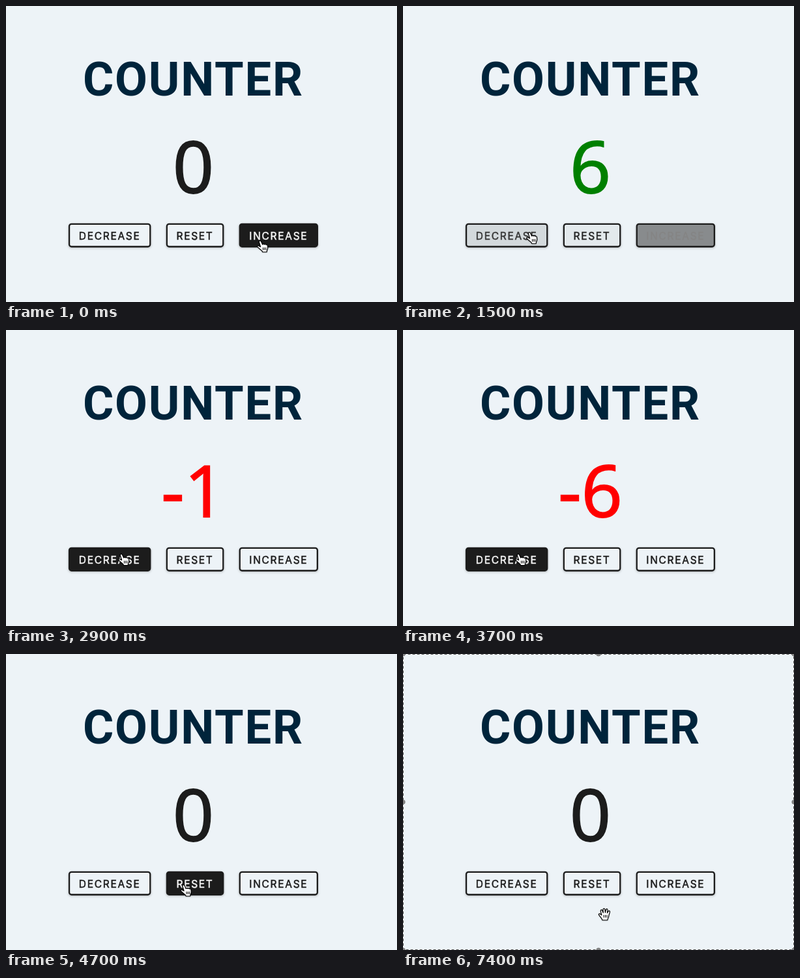
Animation, 600 px wide and 456 px high, one loop 7500 ms. Source, as an HTML page with a canvas:

```html
<!DOCTYPE html>
<html lang="en">
<head>
<meta charset="utf-8">
<title>Counter</title>
<style>
  html, body { margin: 0; width: 100%; height: 100%; overflow: hidden; background: #edf3f7; }
  canvas { display: block; }
</style>
</head>
<body>
<canvas id="stage" width="600" height="456"></canvas>
<script>
const ctx = document.getElementById('stage').getContext('2d');
const W = 600, H = 456, LOOP = 7500, STEP = 100, FADE = 300, CLICK = 167;
const BG = '#edf3f7', INK = 28, LIGHT = 246;
const DARK = `rgb(${INK},${INK},${INK})`;
const CX = 287.5;

// hover: [enter, leave] times in ms
const buttons = [
  { label: 'DECREASE', x: 95.9, w: 126.5, hover: [[1464, 3830]] },
  { label: 'RESET', x: 245.7, w: 88.7, hover: [[1390, 1452], [3880, 4850]] },
  { label: 'INCREASE', x: 357.6, w: 121.4, hover: [[-FADE, 1345]] }
];

// pointer path: time, x, y
const path = [
  [0, 390, 362], [1300, 390, 362], [1345, 358, 360], [1390, 335, 358],
  [1460, 232, 351], [1500, 194, 349], [1700, 177, 345.5], [3750, 177, 345.5],
  [3900, 258, 352], [4000, 272.5, 356], [4750, 272.5, 356], [4850, 285, 373],
  [5000, 308, 398], [5850, 308, 398], [6100, 308.5, 399], [LOOP, 308.5, 399]
];

const clamp = (v, lo, hi) => Math.min(hi, Math.max(lo, v));
const clicks = (t, start, max) => clamp(Math.floor((t - start) / CLICK) + 1, 0, max);

function pointerAt(t) {
  const i = path.findIndex(p => p[0] > t);
  const a = path[i - 1], b = path[i];
  const k = (t - a[0]) / (b[0] - a[0]);
  return [a[1] + (b[1] - a[1]) * k, a[2] + (b[2] - a[2]) * k];
}

function hoverLevel(spans, t) {
  let level = 0;
  for (const [enter, leave] of spans) {
    if (t < enter) continue;
    const peak = clamp((Math.min(t, leave) - enter) / FADE, 0, 1);
    level = Math.max(level, peak - Math.max(0, t - leave) / FADE);
  }
  return level;
}

function valueAt(t) {
  return t >= 4100 ? 0 : clicks(t, 300, 6) - clicks(t, 1830, 12);
}

// grow thickens the strokes, like the smoothing of a desktop browser
function text(str, x, y, font, color, spacing, grow) {
  ctx.font = font;
  ctx.fillStyle = ctx.strokeStyle = color;
  ctx.letterSpacing = spacing + 'px';
  ctx.textAlign = 'left';
  const left = x - ctx.measureText(str).width / 2;
  ctx.fillText(str, left, y);
  if (!grow) return;
  ctx.lineWidth = grow;
  ctx.lineJoin = 'miter';
  ctx.strokeText(str, left, y);
}

function box(x, y, w, h, r) {
  ctx.beginPath();
  ctx.roundRect(x, y, w, h, r);
}

function shadow(color, blur, dy) {
  ctx.shadowColor = color;
  ctx.shadowBlur = blur;
  ctx.shadowOffsetY = dy;
}

function drawButton({ label, x, w, hover }, t) {
  const y = 334.7, h = 37.2, line = 2.3;
  const level = hoverLevel(hover, t);
  ctx.save();
  shadow('rgba(0,0,0,.25)', 3.5, 1.2);
  ctx.fillStyle = BG;
  box(x, y, w, h, 4.6);
  ctx.fill();
  ctx.restore();
  box(x + line / 2, y + line / 2, w - line, h - line, 3.5);
  ctx.fillStyle = `rgba(${INK},${INK},${INK},${level})`;
  ctx.fill();
  ctx.strokeStyle = DARK;
  ctx.lineWidth = line;
  ctx.stroke();
  const c = Math.round(INK + (LIGHT - INK) * level);
  text(label, x + w / 2, 359.7, '400 15.5px Inter, sans-serif', `rgb(${c},${c},${c})`, 1.7, .5);
}

const shapes = {
  arrow: new Path2D('M0 0V14.6L3.4 11.4L6 17.6L8.6 16.5L6 10.5H10.6Z'),
  point: new Path2D('M-1.7 1.3C-1.8-.6 .7-1 1.5 .8L3.6 5.4C4.6 4.2 6 4.5 6.5 5.4' +
    'C7.6 4.4 8.8 4.9 9.2 6C10.4 5.3 11.4 6.2 11.5 7.7L11.7 10.5' +
    'C11.7 13 10.3 13.6 10.2 17H3.8C3 14.4-.2 13.2-1.6 11.4L-4.2 9' +
    'C-4.9 7.5-3.2 6.8-2 7.6L.6 9Z'),
  grab: new Path2D('M-3.2 9C-3.8 6.6-5.6 4.8-7.2 2.8L-8.8 .6C-9-1-7.4-1.5-6.2-.3' +
    'L-4.4 1.2L-6-5.2C-6-7.2-4-7.4-3.4-5.8L-2-2.2L-2.2-7.6' +
    'C-1.8-9.4 .2-9.4 .6-7.6L1.2-2.6L2.4-7.4C3.2-8.9 5-8.3 4.8-6.6' +
    'L4.2-2L6-4.8C7.2-6 8.6-5 8.2-3.4L6.6 2.2C6.4 5.2 4.8 6.4 4.6 9Z')
};

function drawHand(shape, lines, top, bottom) {
  ctx.save();
  shadow('rgba(0,0,0,.3)', 2, 1);
  ctx.fillStyle = '#fff';
  ctx.fill(shape);
  ctx.restore();
  ctx.strokeStyle = '#000';
  ctx.lineWidth = 1.2;
  ctx.lineJoin = 'round';
  ctx.stroke(shape);
  ctx.lineWidth = 1;
  ctx.beginPath();
  for (const x of lines) {
    ctx.moveTo(x, top);
    ctx.lineTo(x + .1, bottom);
  }
  ctx.stroke();
}

function drawArrow() {
  ctx.save();
  shadow('rgba(0,0,0,.35)', 2.5, 1);
  ctx.strokeStyle = '#fff';
  ctx.lineWidth = 2;
  ctx.stroke(shapes.arrow);
  ctx.restore();
  ctx.fillStyle = '#000';
  ctx.fill(shapes.arrow);
}

function drawPointer(t) {
  const [x, y] = pointerAt(t);
  const over = y < 372 && buttons.some(b => x >= b.x && x <= b.x + b.w);
  ctx.save();
  if (t >= 7400) {
    ctx.translate(309.2, 401);
    drawHand(shapes.grab, [-1.2, 1.3, 3.7], 1, 5);
  } else {
    ctx.translate(x, y);
    if (over) drawHand(shapes.point, [4.4, 6.6, 8.8], 10, 14);
    else drawArrow();
  }
  ctx.restore();
}

function drawSelection() {
  ctx.save();
  ctx.lineWidth = 1;
  ctx.strokeStyle = '#fff';
  ctx.strokeRect(.5, .5, W - 1, H - 1);
  ctx.strokeStyle = '#555';
  ctx.setLineDash([4, 3]);
  ctx.strokeRect(.5, .5, W - 1, H - 1);
  ctx.fillStyle = '#808080';
  for (const x of [0, W / 2, W]) {
    for (const y of [0, H / 2, H]) {
      if (x === W / 2 && y === H / 2) continue;
      ctx.beginPath();
      ctx.arc(x, y, 3.6, 0, Math.PI * 2);
      ctx.fill();
    }
  }
  ctx.restore();
}

function draw(now) {
  const t = Math.floor((now % LOOP) / STEP) * STEP;
  const value = valueAt(t);
  ctx.fillStyle = BG;
  ctx.fillRect(0, 0, W, H);
  text('COUNTER', CX, 138.1, '700 72.3px Roboto, sans-serif', '#00243b', 1.8, 0);
  const color = value > 0 ? '#008000' : value < 0 ? '#ff0000' : DARK;
  text(String(value), CX, 287.6, '400 110px "Open Sans", sans-serif', color, 0, 2);
  for (const b of buttons) drawButton(b, t);
  if (t >= 7300) drawSelection();
  drawPointer(t);
}

const start = performance.now();
function tick() {
  draw(performance.now() - start);
  requestAnimationFrame(tick);
}
tick();
</script>
</body>
</html>
```
